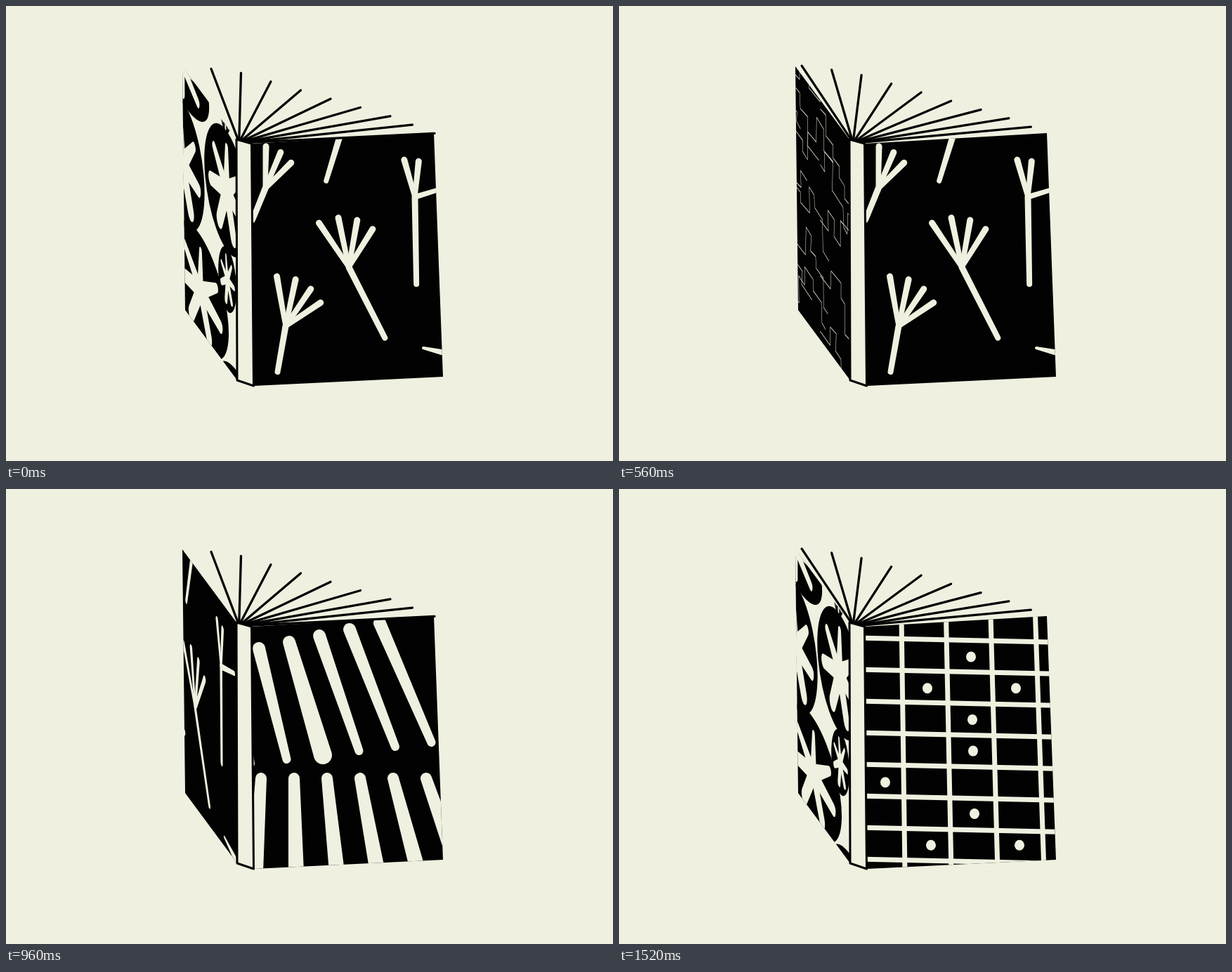
Write an HTML page with a canvas that moves like this. It is 864 px wide and 648 px high and loops after 1.6 s.

```html
<!DOCTYPE html>
<html lang="en">
<head>
<meta charset="utf-8">
<title>Flipping book</title>
<style>
html, body { margin: 0; width: 100%; height: 100%; overflow: hidden; background: #eff0df; }
canvas { display: block; }
</style>
</head>
<body>
<canvas id="stage" width="864" height="648"></canvas>
<script>
const ctx = document.getElementById('stage').getContext('2d');
const CREAM = '#eff0df', INK = '#020202', PLUM = '#1a1016', CHALK = '#d3d4c5';
const STEP = 80, STEPS = 20;
const RIGHT = [350, 196, 609, 181, 622, 528, 353, 541];
const LEFT = [251, 86, 328, 190, 329, 533, 255, 433];
const SPINE = [328, 190, 349.5, 196, 352.5, 541, 329, 533];
// Maps cover artwork onto the foreshortened back cover.
const BACK = new DOMMatrix([0.392, 0.54, 0, 1.1, 78, -360.6]);

const hash = n => { const v = Math.sin(n * 127.1 + 11.7) * 43758.5453; return v - Math.floor(v); };
const between = (lo, hi, seed) => lo + (hi - lo) * hash(seed);
const rad = degrees => degrees * Math.PI / 180;

function repeat(count, action) {
  for (let i = 0; i < count; i++) action(i);
}
function trace(pts, closed) {
  ctx.beginPath();
  for (let i = 0; i < pts.length; i += 2) ctx.lineTo(pts[i], pts[i + 1]);
  if (closed) ctx.closePath();
}
function poly(...pts) { trace(pts, true); ctx.fill(); }
function line(width, ...pts) { ctx.lineWidth = width; trace(pts); ctx.stroke(); }
function ink(color) { ctx.fillStyle = ctx.strokeStyle = color; }
function paint(ground, mark) {
  ink(ground);
  ctx.fillRect(200, 50, 500, 560);
  ink(mark);
}
function oval(x, y, rx, ry = rx, turn = 0) {
  ctx.beginPath();
  ctx.ellipse(x, y, rx, ry, turn, 0, 7);
  ctx.fill();
}
// Bar with round ends of different radius.
function taper(x1, y1, r1, x2, y2, r2) {
  const a = Math.atan2(y2 - y1, x2 - x1), h = Math.PI / 2;
  ctx.beginPath();
  ctx.arc(x1, y1, r1, a + h, a - h);
  ctx.arc(x2, y2, r2, a - h, a + h);
  ctx.fill();
}
function limb(x, y, r1, angle, length, r2) {
  taper(x, y, r1, x + length * Math.cos(rad(angle)), y + length * Math.sin(rad(angle)), r2);
}

function twig(x, y, stemAngle, stem, firstFinger, fingers, reach) {
  limb(x, y, 4.5, stemAngle, stem, 4);
  repeat(fingers, i => limb(x, y, 3.5, firstFinger + 22 * i, reach - 4 * i, 4.5));
}
function twigs() {
  paint(INK, CREAM);
  twig(369, 260, 112, 48, -89, 3, 60);
  twig(582, 272, 89, 124, -106, 2, 55);
  twig(488, 372, 63, 113, -124, 4, 76);
  twig(398, 456, 100, 66, -100, 4, 72);
  limb(582, 272, 4, -17, 50, 3);
  limb(475, 186, 4.5, 107, 66, 3.5);
  limb(594, 487, 2, 13, 40, 5);
}

function star(x, y, r, seed) {
  const spikes = 8;
  repeat(spikes, i => {
    const a = (i + 0.6 * hash(seed * 9 + i)) / spikes * 2 * Math.PI;
    const length = r * between(0.75, 1.1, seed * 5 + i * 3), w = between(4, 8, seed + i * 7);
    const c = Math.cos(a), s = Math.sin(a), mx = x + c * length * 0.55, my = y + s * length * 0.55;
    ctx.beginPath();
    ctx.moveTo(x, y);
    ctx.quadraticCurveTo(mx - s * w, my + c * w, x + c * length, y + s * length);
    ctx.quadraticCurveTo(mx + s * w, my - c * w, x, y);
    ctx.fill();
  });
  oval(x, y, r * 0.28);
}
function stars() {
  paint(CREAM, PLUM);
  const column = (x, y, dx, dy, count) =>
    repeat(count, i => star(x + dx * i, y + dy * i, between(21, 25, x + i), x + i));
  column(357, 251, 0, 92, 4);
  column(445, 203, -7, 95, 4);
  column(488, 247, -25, 163, 2);
  column(540, 185, 2, 84, 5);
  column(592, 216, 11, 90, 4);
}

function specks(x, y, w, h, count) {
  repeat(count, i => {
    const k = x + y * 3 + i * 5, r = between(0.6, 2.3, k + 2) * hash(k + 4);
    oval(x + w * hash(k), y + h * hash(k + 1), r * 1.3, r, hash(k + 3) * 3);
  });
}
function brush() {
  paint(CREAM, INK);
  // Slivers of ground left between the zigzag strokes.
  poly(351, 242, 414, 192, 497, 186, 380, 267, 351, 258);
  poly(383, 301, 547, 200, 547, 232);
  poly(351, 347, 517, 272, 351, 378);
  poly(640, 240, 600, 256, 364, 405, 390, 541, 497, 535, 640, 527);
  ink(CREAM);
  taper(345, 440, 16, 452, 370, 18);
  taper(370, 480, 50, 490, 448, 33);
  taper(380, 530, 25, 487, 511, 20);
  poly(640, 282, 543, 297, 547, 344, 640, 344);
  oval(620, 390, 72, 44);
  poly(538, 478, 575, 461, 640, 465, 640, 524, 541, 519);
  ink(INK);
  taper(398, 489, 14, 489, 442, 7);
  taper(400, 544, 6, 478, 520, 5);
  taper(369, 410, 6, 378, 404, 2);
  poly(360, 541, 368, 523, 379, 541);
  poly(558, 391, 622, 398, 622, 412, 588, 408);
  line(2, 545, 296, 612, 284);
  repeat(7, i => {
    line(2.5, 550, 348 + i * 4, 580 - i * 4, 345 + i * 4);
    line(2.5, 536, 461 + i * 3, between(550, 575, i), 460 + i * 3);
  });
  specks(548, 186, 62, 75, 90);
  specks(445, 222, 100, 85, 90);
  specks(385, 345, 85, 72, 80);
  specks(548, 296, 64, 42, 28);
  specks(460, 430, 62, 90, 50);
  specks(538, 468, 80, 48, 45);
}

function flower(x, y, rx, ry, phase, petals = 7) {
  ink(INK);
  oval(x, y, rx, ry, 0.1);
  ink(CREAM);
  repeat(petals, i => {
    const a = rad(phase + 360 * i / petals), size = Math.min(rx, ry);
    const width = size * (0.11 + 0.04 * Math.sin(a));
    taper(x, y, size * 0.16, x + 0.72 * rx * Math.cos(a), y + 0.72 * ry * Math.sin(a), width);
  });
}
function flowers() {
  paint(CREAM, INK);
  flower(442, 314, 80, 80, -96);
  flower(507, 447, 103, 71, -141);
  flower(602, 271, 81, 77, -90);
  flower(605, 385, 33, 41, -155);
  flower(442, 188, 97, 48, -65);
  flower(345, 269, 29, 38, 0);
  flower(328, 408, 55, 64, -50);
  flower(361, 505, 27, 35, -90);
  flower(455, 552, 80, 38, -65);
  flower(645, 545, 85, 58, 0);
  flower(598, 178, 17, 20, 90);
}

function stripes() {
  paint(INK, CREAM);
  repeat(6, i => {
    taper(317 + 43 * i, 236 - 9 * i, 9, 348 + 51.5 * i, 391 - 6 * i, i === 2 ? 13 : 6);
    taper(363 + 47 * i, 412, 8, 355 + 58 * i, 546, 11);
  });
}

function hatch() {
  paint(CREAM, INK);
  repeat(18, i => {
    const x = 270 + 20 * i, y = between(350, 560, i);
    line(between(14, 24, i + 40), x, y, x + 110, y - 150);
  });
  repeat(9, i => {
    const x = 270 + 40 * i, y = between(270, 380, i + 70);
    line(11, x, y, x + 45, y + 170);
  });
}

// Thin wandering outlines that alternate level and upright runs.
function maze() {
  paint(INK, CHALK);
  repeat(15, k => {
    let x = 352 + 90 * (k % 3), y = 200 + 72 * Math.floor(k / 3);
    const pts = [x, y];
    repeat(9, i => {
      const seed = k * 20 + i, run = between(12, 42, seed), skew = between(-3, 3, seed + 400);
      const up = hash(seed + 900) < 0.5 ? -1 : 1;
      x += i % 2 ? skew : run;
      y += i % 2 ? run * up : skew;
      pts.push(x, y);
    });
    line(1.4, ...pts);
  });
}

function grid() {
  paint(INK, CREAM);
  repeat(4, i => line(7, 402 + 63.5 * i, 180, 407 + 66 * i, 545));
  repeat(8, i => line(7, 340, 212 + 45 * i, 650, 219 + 45 * i));
  // Dotted columns in each row of cells.
  ['24', '13', '2', '24', '0', '24', '13'].forEach((cells, row) => {
    for (const col of cells) oval(375 + 63 * col + row, 239 + 44.7 * row, 7, 7.5);
  });
}

const covers = [twigs, stars, brush, twigs, flowers, maze, stripes, hatch, maze, grid];

function cover(shape, art, matrix) {
  ctx.save();
  trace(shape, true);
  ctx.clip();
  if (matrix) ctx.setTransform(matrix);
  art();
  ctx.restore();
}

function pages(phase) {
  ink(INK);
  repeat(9, i => {
    const u = i - phase;
    const x = 292 + 42.5 * u - 11 * Math.max(0, u - 6);
    const y = 83 + 12.3 * u + 6.5 * Math.max(0, 1 - u);
    line(3.3, 330 + 1.8 * i, 189.6 + 0.6 * i, x, y);
  });
}

function draw(now) {
  const step = Math.floor(now / STEP) % STEPS;
  ctx.lineCap = ctx.lineJoin = 'round';
  ink(CREAM);
  ctx.fillRect(0, 0, 864, 648);
  // The back cover repeats the front artwork eleven steps later.
  cover(LEFT, covers[(step + 9) % STEPS >> 1], BACK);
  cover(RIGHT, covers[step >> 1]);
  pages(step % 4 / 4);
  ink(CREAM);
  poly(...SPINE);
  ink(INK);
  line(3, ...SPINE, SPINE[0], SPINE[1]);
}

let start;
function tick(now) {
  start ??= now;
  draw(now - start);
  requestAnimationFrame(tick);
}
draw(0);
requestAnimationFrame(tick);
</script>
</body>
</html>
```
